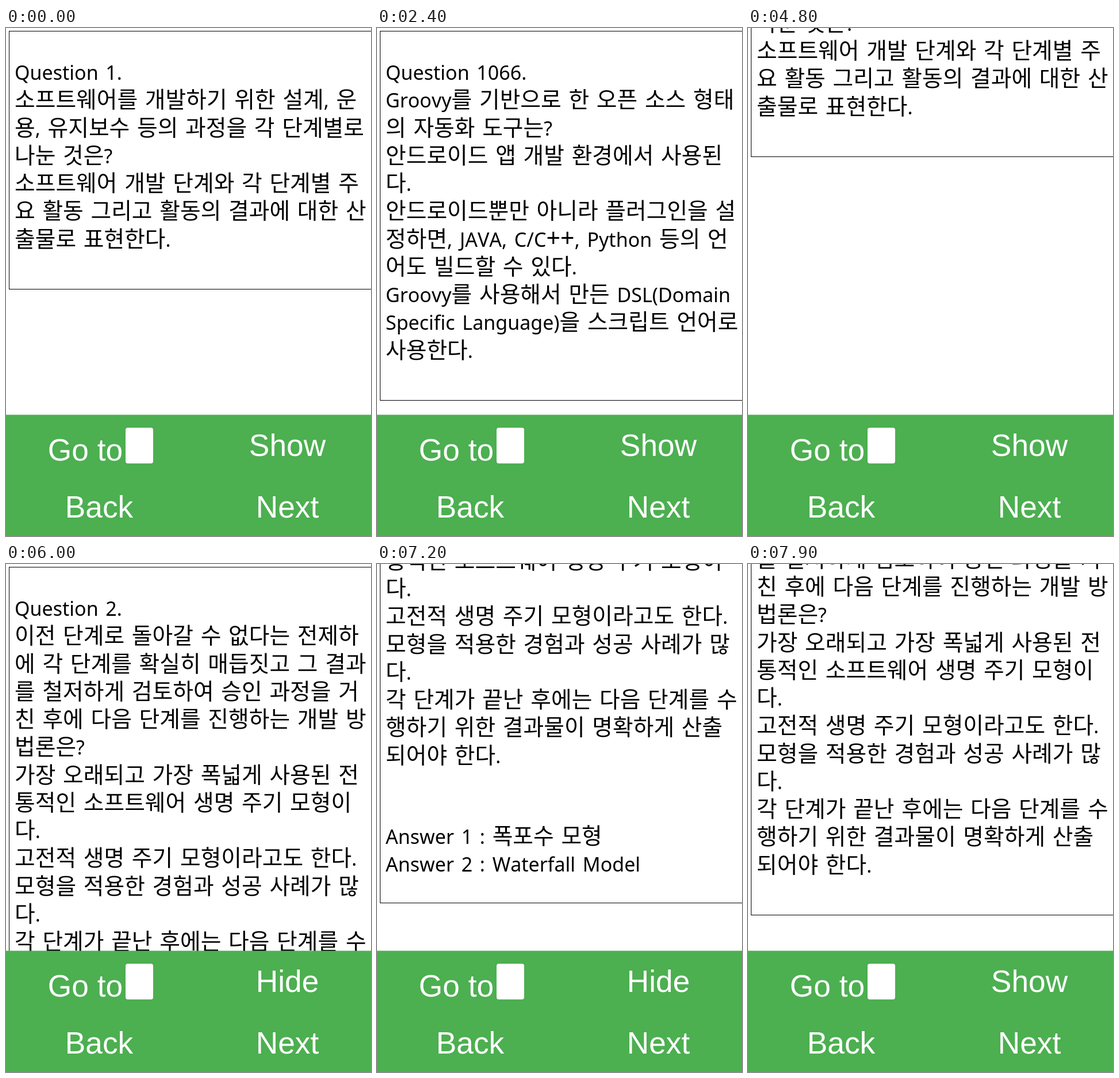
Recreate the animation shown at these times as an HTML page with a canvas. Size 635x882 px, loop 8 s.

```html
<!DOCTYPE html>
<html lang="ko">
<head>
<meta charset="utf-8">
<title>Quiz cards</title>
<style>
  html, body { margin: 0; width: 100%; height: 100%; overflow: hidden; background: #fff; }
  canvas { display: block; }
</style>
</head>
<body>
<canvas id="stage" width="635" height="882"></canvas>
<script>
const ctx = document.getElementById('stage').getContext('2d');
const WIDTH = 635, HEIGHT = 882, LOOP = 8000, STEP = 100;
const BAR_TOP = 671.5, FIRST_BASELINE = 90.2, LINE = 48.25, LEFT = 15, SPACE = 12.7;

const cards = {
  1: {
    text: `소프트웨어를 개발하기 위한 설계, 운
용, 유지보수 등의 과정을 각 단계별로
나눈 것은?
소프트웨어 개발 단계와 각 단계별 주
요 활동 그리고 활동의 결과에 대한 산
출물로 표현한다.`,
    answers: ['소프트웨어 생명 주기', 'Software Life Cycle'],
  },
  2: {
    text: `이전 단계로 돌아갈 수 없다는 전제하
에 각 단계를 확실히 매듭짓고 그 결과
를 철저하게 검토하여 승인 과정을 거
친 후에 다음 단계를 진행하는 개발 방
법론은?
가장 오래되고 가장 폭넓게 사용된 전
통적인 소프트웨어 생명 주기 모형이
다.
고전적 생명 주기 모형이라고도 한다.
모형을 적용한 경험과 성공 사례가 많
다.
각 단계가 끝난 후에는 다음 단계를 수
행하기 위한 결과물이 명확하게 산출
되어야 한다.`,
    answers: ['폭포수 모형', 'Waterfall Model'],
  },
  1066: {
    text: `Groovy를 기반으로 한 오픈 소스 형태
의 자동화 도구는?
안드로이드 앱 개발 환경에서 사용된
다.
안드로이드뿐만 아니라 플러그인을 설
정하면, JAVA, C/C++, Python 등의 언
어도 빌드할 수 있다.
Groovy를 사용해서 만든 DSL(Domain
Specific Language)을 스크립트 언어로
사용한다.`,
    answers: ['Gradle'],
  },
};

// [time, card, answers open]
const states = [
  [0, 1, false], [1500, 1, true], [1900, 1, false],
  [2400, 1066, false], [2700, 1066, true], [3000, 1066, false], [3700, 1066, true],
  [4600, 1066, false], [4800, 1, false], [5700, 1, true],
  [6000, 2, true], [7900, 2, false],
];

// [time, scroll offset]
const scrollKeys = [
  [0, 0], [3900, 0], [4100, 231], [4300, 345], [4400, 345], [4600, 230],
  [5100, 230], [5400, 0], [6500, 0], [7000, 460], [7100, 460], [7200, 420],
  [7800, 230], [LOOP, 230],
];

function scrollAt(t) {
  const i = scrollKeys.findIndex(key => key[0] > t);
  const [t0, y0] = scrollKeys[i - 1], [t1, y1] = scrollKeys[i];
  return y0 + (y1 - y0) * (t - t0) / (t1 - t0);
}

function fontFor(run) {
  if (/[가-힣]/.test(run)) return '38.8px "Noto Sans CJK KR", "Noto Sans CJK", sans-serif';
  return `${run[0] === '+' ? 43 : 34}px "Noto Sans", sans-serif`;
}

function drawLine(text, y) {
  let x = LEFT;
  for (const run of text.match(/[가-힣]+|\++| |[^가-힣+ ]+/g)) {
    if (run !== ' ') {
      ctx.font = fontFor(run);
      ctx.fillText(run, x, y);
      x += ctx.measureText(run).width;
    } else {
      x += SPACE;
    }
  }
}

function drawCard(number, open, scroll) {
  const { text, answers } = cards[number];
  const lines = [`Question ${number}.`, ...text.split('\n')];
  ctx.fillStyle = '#000';
  ctx.textAlign = 'left';
  ctx.fontKerning = 'none';
  lines.forEach((line, i) => drawLine(line, FIRST_BASELINE + i * LINE - scroll));

  const last = FIRST_BASELINE + (lines.length - 1) * LINE;
  let bottom = last + 74;
  if (open) {
    const first = last + 140.5;
    answers.forEach((answer, i) =>
      drawLine(`Answer ${i + 1} : ${answer}`, first + i * LINE - scroll));
    bottom = first + (answers.length - 1) * LINE + 54;
  }
  const top = Math.round(5 - scroll), end = Math.floor(bottom - scroll);
  ctx.fillRect(5, top, WIDTH, 1);
  ctx.fillRect(5, end, WIDTH, 1);
  ctx.fillRect(5, top, 1, end - top);
}

function drawButtons(open) {
  ctx.fillStyle = '#4caf50';
  ctx.fillRect(0, BAR_TOP, WIDTH, HEIGHT - BAR_TOP);
  ctx.fillStyle = '#fff';
  ctx.font = '53.3px "Liberation Sans", Arial, sans-serif';
  ctx.textAlign = 'center';
  ctx.fontKerning = 'auto';
  ctx.fillText('Go to', 138, 751);
  ctx.fillText(open ? 'Hide' : 'Show', 489.5, 743);
  ctx.fillText('Back', 162, 850);
  ctx.fillText('Next', 489.5, 850);
  ctx.beginPath();
  ctx.roundRect(208, 694, 48, 62, 4);
  ctx.fill();
}

function frame(now) {
  const t = Math.floor((now % LOOP) / STEP) * STEP;
  const [, number, open] = states.findLast(state => state[0] <= t);
  ctx.fillStyle = '#fff';
  ctx.fillRect(0, 0, WIDTH, HEIGHT);
  drawCard(number, open, scrollAt(t));
  drawButtons(open);
}

const start = performance.now();
function tick() {
  frame(performance.now() - start);
  requestAnimationFrame(tick);
}
tick();
</script>
</body>
</html>
```
